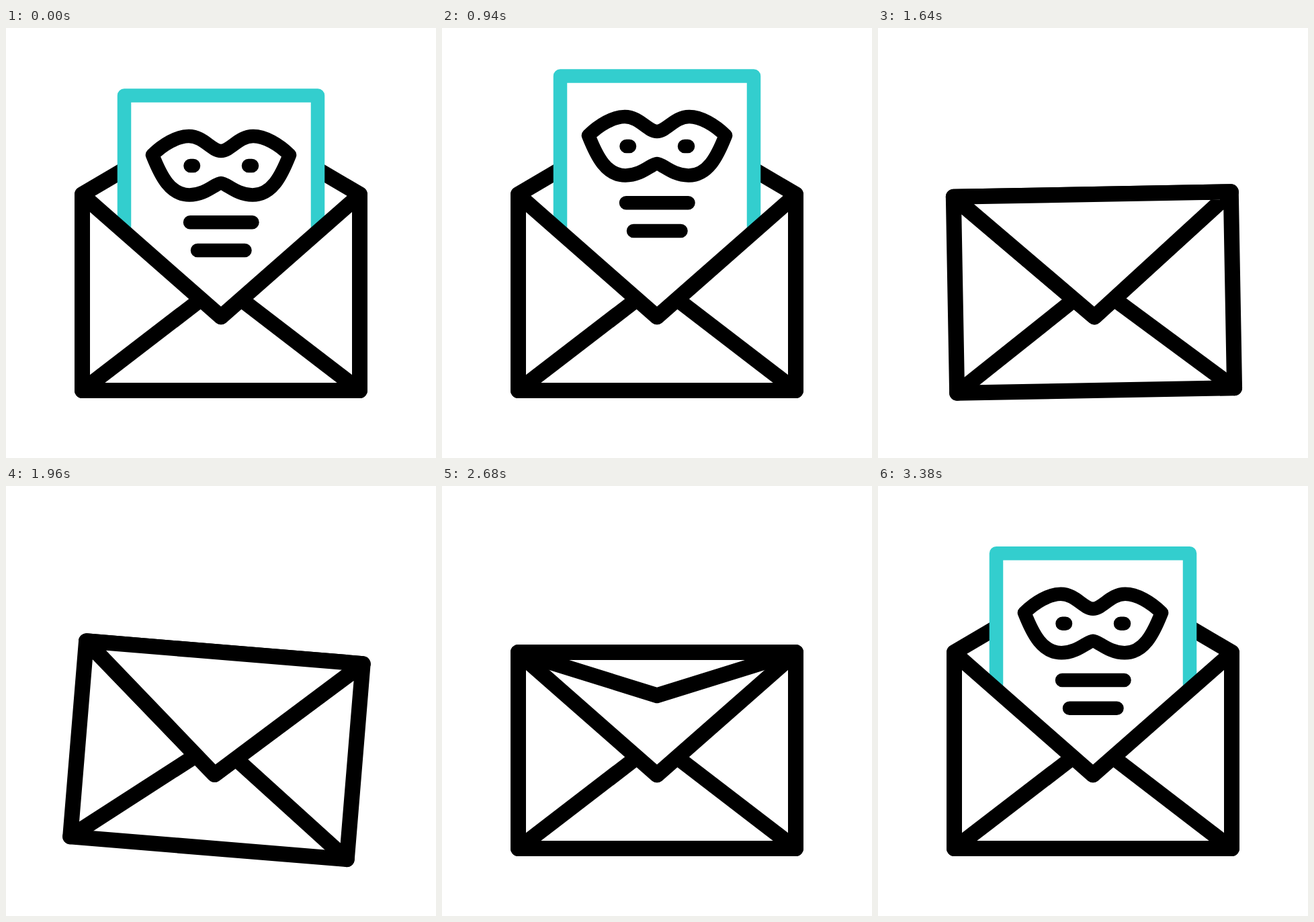
These frames come from a looping animation (640x640 px, 3.6 s). An HTML page:

```html
<!DOCTYPE html>
<html lang="en">
<head>
<meta charset="utf-8">
<title>Masquerade invitation</title>
<style>
  html, body { margin: 0; width: 100%; height: 100%; overflow: hidden; background: #fff; }
  svg { display: block; width: 100%; height: 100%; }
  .ink { fill: none; stroke: #000; stroke-width: 23; stroke-linecap: round; stroke-linejoin: round; }
  .filled { fill: #fff; }
  .thin { stroke-width: 20.5; }
  .card { fill: #fff; stroke: #33cece; stroke-width: 20.5; stroke-linejoin: round; }
</style>
</head>
<body>
<svg viewBox="0 0 640 640">
  <clipPath id="inside"><rect width="640" height="540"/></clipPath>
  <g id="envelope">
    <path id="back" class="ink filled"/>
    <g clip-path="url(#inside)">
      <g id="paper">
        <path class="card" d="M176 100.5H464V840H176Z"/>
        <g id="mask" class="ink thin">
          <path d="M218 189C234 173 255 161 272 161C294 161 306 183 320 183C334 183 346 161 368 161C385 161 406 173 422 189C409 222 395 248.500 367 248.500C343 248.500 328 231 320 231C312 231 297 248.500 273 248.500C245 248.500 231 222 218 189Z"/>
          <path d="M274.5 205H279M361 205H366"/>
        </g>
        <path class="ink thin" d="M274 289.3H366.5M285 331H355.5"/>
      </g>
    </g>
    <path class="ink filled" d="M113.5 248.5L320 430L526.5 248.5V539.5H113.5Z"/>
    <path class="ink" d="M113.5 539.5L290 404M526.5 539.5L350 404"/>
    <path id="flap" class="ink filled"/>
  </g>
</svg>
<script>
const LOOP = 3600, RIM = 247.5;
const $ = id => document.getElementById(id);
const envelope = $('envelope'), back = $('back'), paper = $('paper'), mask = $('mask'), flap = $('flap');

// Keyframes are [time, value] pairs, eased in and out between neighbours.
const maskTurn = [[0, 0], [190, 7.4], [390, -7.4], [590, 7.4], [780, 0]];
const paperShift = [[740, 0], [1020, -36], [1420, 366], [2640, 366], [3000, -36], [3400, 0]];
const flapTip = [[1200, 126], [1400, RIM], [1600, 430], [2561, 430], [2761, RIM], [2960, 126]];
const dip = [[1400, 0], [1500, 18], [1600, 0]];
const sway = [[1600, 0], [1740, -5], [1940, 5], [2140, -5], [2340, 5], [2540, 0]];

function at(keys, t) {
  const next = keys.findIndex(key => key[0] > t);
  if (next === 0) return keys[0][1];
  if (next < 0) return keys[keys.length - 1][1];
  const [t0, v0] = keys[next - 1], [t1, v1] = keys[next];
  const u = (t - t0) / (t1 - t0);
  return v0 + (v1 - v0) * u * u * (3 - 2 * u);
}

const fold = tip => `M113.5 ${RIM}L320 ${tip}L526.5 ${RIM}`;

function draw() {
  const t = performance.now() % LOOP;
  const tip = at(flapTip, t);
  back.setAttribute('d', fold(Math.min(tip, RIM)));
  flap.setAttribute('d', tip > RIM ? fold(tip) + 'Z' : '');
  paper.setAttribute('transform', `translate(0 ${at(paperShift, t)})`);
  mask.setAttribute('transform', `rotate(${at(maskTurn, t)} 320 205)`);
  envelope.setAttribute('transform', `translate(0 ${at(dip, t)}) rotate(${at(sway, t)} 320 313)`);
  requestAnimationFrame(draw);
}
draw();
</script>
</body>
</html>
```
